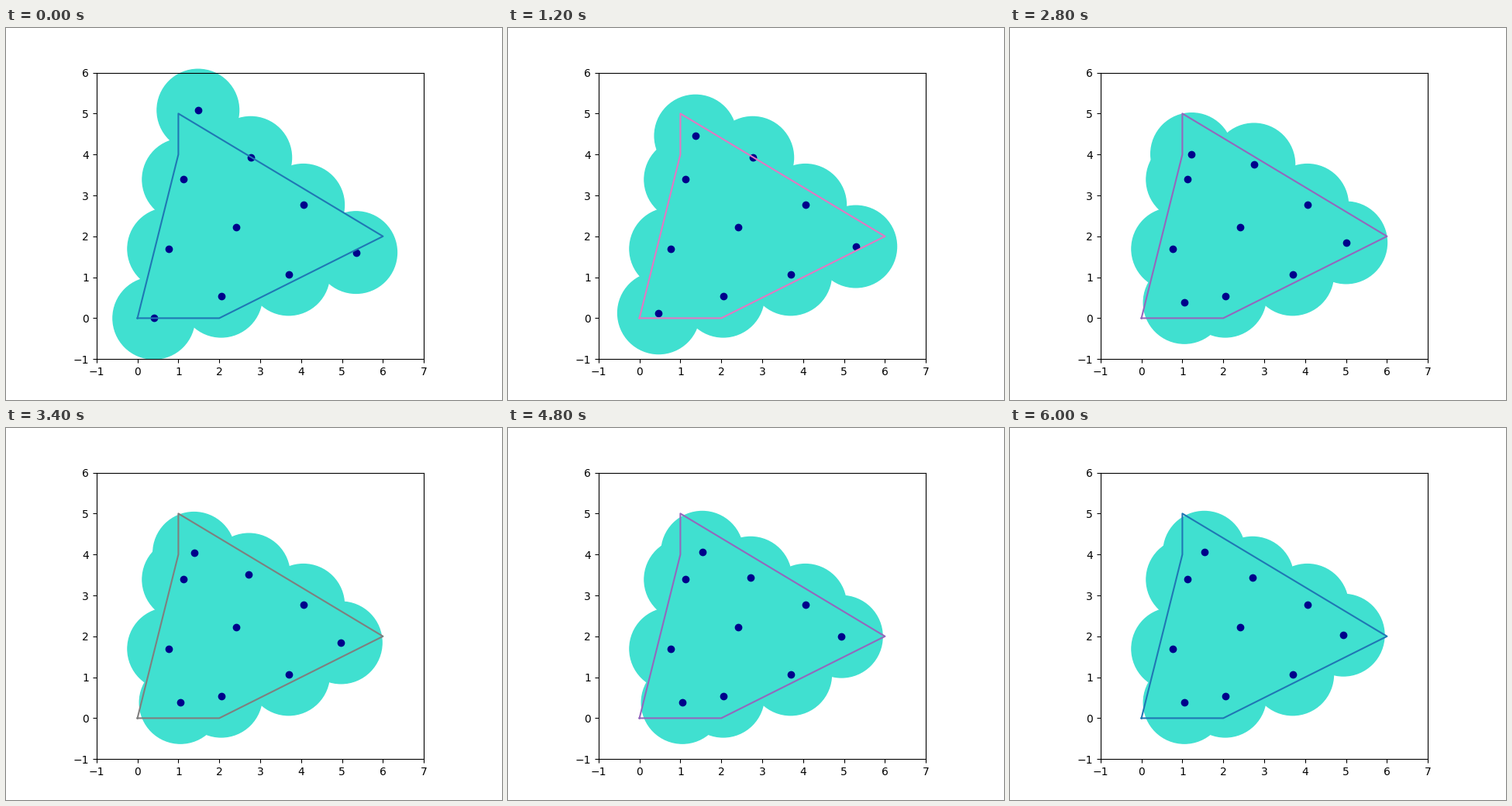
These frames come from a looping animation (640 px wide and 480 px high, 6200 ms). A matplotlib script:

```python
import numpy as np
import matplotlib.pyplot as plt
from matplotlib.animation import FuncAnimation
from matplotlib.patches import Circle

FRAMES, INTERVAL = 31, 200
RADIUS = 1.0
REGION = np.array([(0, 0), (2, 0), (6, 2), (1, 5), (1, 4), (0, 0)])


def lattice(origin=(0.4, 0.0), angle=18, rows=4):
    """Triangular arrangement of hexagonal covering centres."""
    a, b = np.radians([angle, angle + 60])
    step = np.sqrt(3) * RADIUS
    u = step * np.array([np.cos(a), np.sin(a)])
    v = step * np.array([np.cos(b), np.sin(b)])
    return {(i, j): np.array(origin) + i * u + j * v
            for j in range(rows) for i in range(rows - j)}


START = lattice()

# Only the centres near the corners drift; key points are (step, x, y).
DRIFT = {
    (0, 0): [(10, 0.515, 0.21), (12, 1.05, 0.38)],
    (3, 0): [(10, 5.25, 1.845), (13, 5.01, 1.845), (20, 4.95, 1.845),
             (25, 4.935, 2.03)],
    (1, 2): [(12, *START[1, 2]), (18, 2.715, 3.43)],
    (0, 3): [(6, 1.37, 4.455), (10, 1.025, 3.985), (20, 1.535, 4.055)],
}


def centre(key, k):
    t, x, y = np.transpose([(0, *START[key]), *DRIFT.get(key, [])])
    return np.interp(k, t, x), np.interp(k, t, y)


fig, ax = plt.subplots(figsize=(6.4, 4.8), dpi=100)
ax.set_aspect("equal")
ax.set_xlim(-1, 7)
ax.set_ylim(-1, 6)

discs = [ax.add_patch(Circle(p, RADIUS, color="turquoise", clip_on=False))
         for p in START.values()]
dots, = ax.plot([], [], "o", color="darkblue")
outline, = ax.plot(*REGION.T)


def update(k):
    points = [centre(key, k) for key in START]
    for disc, p in zip(discs, points):
        disc.center = p
    dots.set_data(*zip(*points))
    outline.set_color(f"C{k % 10}")
    return [*discs, dots, outline]


anim = FuncAnimation(fig, update, frames=FRAMES, interval=INTERVAL,
                     repeat=True, repeat_delay=0)
plt.show()
```
